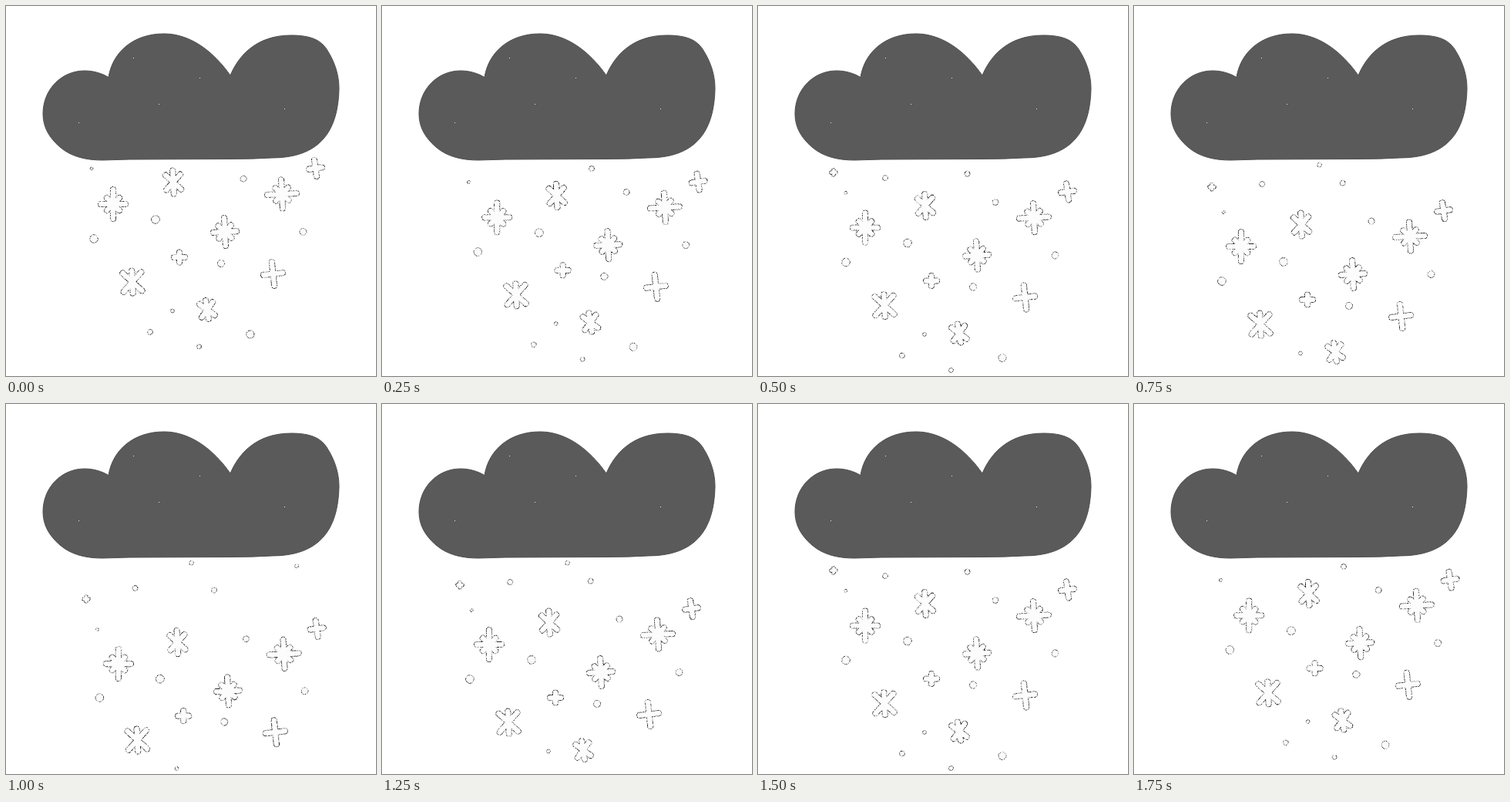
These frames come from a looping animation (480 px wide and 480 px high, 2 s). An HTML page with a canvas:

```html
<!DOCTYPE html>
<html>
<head>
<meta charset="utf-8">
<title>Snow cloud</title>
<style>
  html, body { margin: 0; width: 100%; height: 100%; overflow: hidden; background: #fff; }
  canvas { display: block; width: 480px; height: 480px; }
</style>
</head>
<body>
<canvas id="stage" width="480" height="480"></canvas>
<script>
const ctx = document.getElementById('stage').getContext('2d');
const STEP = 250;
const LAST = 4;
const FLOOR = 477;

// The snow swings down and back up through five held poses.
const DROP = [0, 17, 30.5, 55, 79];
const SWAY = [0, 9.4, 0, 0, 4.4];
const SCALE = [1, 0.994, 1, 1, 0.98];
const CENTER = { x: 265, y: 310 };

// x, y, then arm lengths (vertical, horizontal, diagonal) and tilt in degrees
const FLAKES = [
  [139, 257, 19, 16, 11.5, 0],
  [358, 244, 18.5, 19, 11.5, -3],
  [284, 293, 18, 15, 11.5, -3],
  [217, 228.5, 15, 0, 13.5, -3],
  [164, 358, 14.5, 0, 17, -3],
  [261, 394, 12, 0, 12, -9],
  [401.5, 210.5, 10.5, 8.5, 0, -8],
  [346.5, 347.5, 15.5, 12.5, 0, -6],
  [225, 326, 6.5, 7, 0, 0]
];

// x, y, radius
const DOTS = [
  [308, 224, 4], [194, 277, 5.4], [114, 302, 5.3], [385.5, 293, 4.5], [279, 334, 4.6],
  [216, 395.5, 2.4], [187, 423, 3.4], [250.5, 442, 3], [317, 426, 5.1]
];

// Dots leaving the cloud: first pose, start, end, radius
const FRESH = [
  { first: 0, a: [111, 211], b: [118.5, 292.5], r: 2 },
  { first: 1, a: [272, 211], b: [270, 241.5], r: 3.5 },
  { first: 2, a: [165, 223], b: [167.5, 239], r: 3.5 },
  { first: 3, a: [240.5, 206], b: [240.5, 206], r: 3 },
  { first: 4, a: [377, 210], b: [377, 210], r: 2.6 }
];
const SPROUT = { first: 2, a: [98, 216], b: [104, 253] };

const SPECKS = [[94, 151], [198, 127], [165, 67], [251, 93], [361, 133]];

const cloud = new Path2D(
  'M133 92.5 C138 60 165 36 205 36 C240 36 270 60 291 90 C302 64 325 38 370 38' +
  ' C395 38 408 44 416 56 C427 73 432 90 432 107 C431 165 405 197 345 197' +
  ' Q320 198.5 290 198.5 L160 199 L125 200 C105 200 85 196 70 183' +
  ' C56 171 48 157 48 140 C48 108 72 84 102 84 C113 84 124 87 133 92.5 Z');

// Grainy pencil texture for the outlines
function makeGrain(size = 61) {
  const tile = document.createElement('canvas');
  tile.width = tile.height = size;
  const g = tile.getContext('2d');
  let seed = 7;
  for (let i = 0; i < size * size; i++) {
    seed = (seed * 16807) % 2147483647;
    const v = Math.round(15 + 240 * seed / 2147483647);
    g.fillStyle = `rgb(${v},${v},${v})`;
    g.fillRect(i % size, Math.floor(i / size), 1, 1);
  }
  return ctx.createPattern(tile, 'repeat');
}
const grain = makeGrain();

function drawFlake(x, y, vert, horiz, diag, tilt, width = 6.2) {
  const path = new Path2D();
  for (let i = 0; i < 8; i++) {
    const length = i % 2 ? diag : i % 4 ? vert : horiz;
    const angle = i * Math.PI / 4 + tilt * Math.PI / 180;
    // Shorten by the round cap so arms end at a natural tip.
    if (!length) continue;
    path.moveTo(x, y);
    path.lineTo(x + length * Math.cos(angle), y + length * Math.sin(angle));
  }
  ctx.lineCap = ctx.lineJoin = 'round';
  ctx.strokeStyle = grain;
  ctx.lineWidth = width + 2;
  ctx.stroke(path);
  ctx.strokeStyle = '#fcfcfc';
  ctx.lineWidth = width;
  ctx.stroke(path);
}

function drawDot(x, y, r) {
  ctx.beginPath();
  ctx.arc(x, y, r, 0, Math.PI * 2);
  ctx.fillStyle = '#fafafa';
  ctx.fill();
  ctx.strokeStyle = grain;
  ctx.lineWidth = 1;
  ctx.stroke();
}

// Position of an emerging piece, paced like the falling snow
function emerge({ first, a, b }, n) {
  const k = (DROP[n] - DROP[first]) / (DROP[LAST] - DROP[first] || 1);
  return a.map((v, i) => v + (b[i] - v) * k);
}

function draw(n) {
  const place = (x, y) => [
    CENTER.x + SWAY[n] + (x - CENTER.x) * SCALE[n],
    CENTER.y + DROP[n] + (y - CENTER.y) * SCALE[n]
  ];
  ctx.fillStyle = '#fff';
  ctx.fillRect(0, 0, 480, 480);

  for (const [x, y, ...shape] of FLAKES) {
    const [px, py] = place(x, y);
    if (py + shape[0] < FLOOR) drawFlake(px, py, ...shape);
  }
  for (const [x, y, r] of DOTS) {
    const [px, py] = place(x, y);
    if (py + r < FLOOR) drawDot(px, py, r);
  }
  for (const dot of FRESH) {
    if (n >= dot.first) drawDot(...emerge(dot, n), dot.r);
  }
  if (n >= SPROUT.first) drawFlake(...emerge(SPROUT, n), 3, 3, 0, 0, 3.6);

  ctx.fillStyle = '#5a5a5a';
  ctx.strokeStyle = '#505050';
  ctx.lineWidth = 1;
  ctx.fill(cloud);
  ctx.stroke(cloud);
  ctx.fillStyle = '#e8e8e8';
  for (const [x, y] of SPECKS) ctx.fillRect(x, y, 1, 1);
}

const start = performance.now();
let shown = -1;
function tick() {
  const step = Math.floor(Math.max(0, performance.now() - start) / STEP) % (2 * LAST);
  const n = LAST - Math.abs(LAST - step);
  if (n !== shown) draw(shown = n);
  requestAnimationFrame(tick);
}
tick();
</script>
</body>
</html>
```
